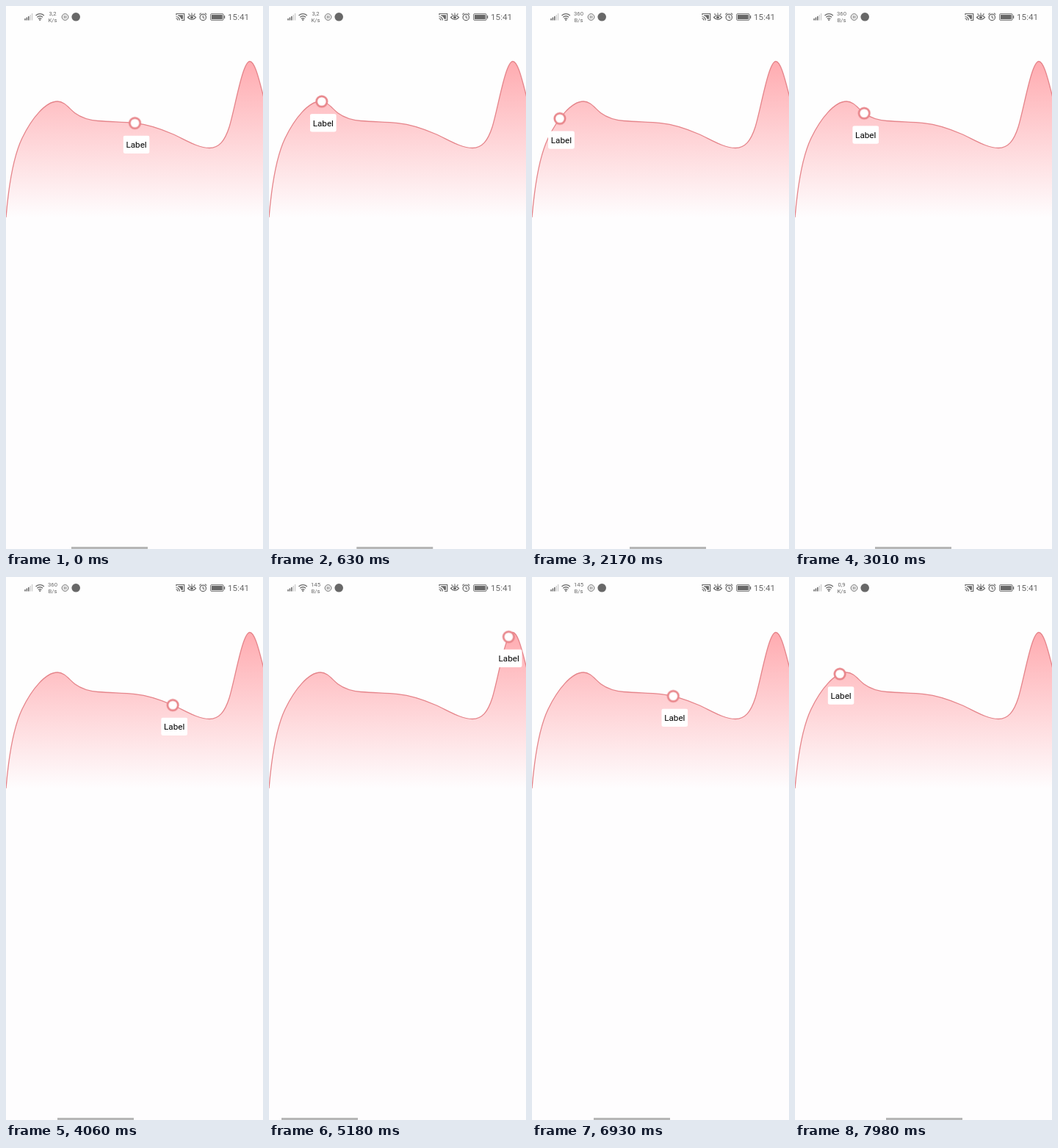
An HTML page without scripts for the animation above (8000 ms loop, 350 by 740 pixels).

```html
<!DOCTYPE html>
<html lang="en">
<head>
<meta charset="utf-8">
<title>Line chart cursor</title>
<style>
@property --bar { syntax: "<length>"; inherits: true; initial-value: 89px; }
@property --dist { syntax: "<length>"; inherits: true; initial-value: 296px; }

html, body { margin: 0; width: 100%; height: 100%; overflow: hidden; background: #fefefe; }

.stage {
  /* runs past the screen edges so that one path serves line, fill and motion */
  --curve: path("M0 288C4 240 10 205 22 180C35 153 54 130 70 130C80 130 86 140 94 146C103 152.5 113 155.5 125 156.5C145 158 160 158 175.6 159.6C194 161.5 210 167 227 174.5C243 181.5 261 193.5 277 193.5C290 193.5 298 184 304 165C312 139 322 75.5 332 75.5C338 75.5 343 93 350 121L360 161V800H-10V288");
  position: relative;
  width: 350px;
  height: 740px;
  overflow: hidden;
  font-family: Roboto, sans-serif;
  animation: scrub 8s infinite;
}
svg { position: absolute; left: 0; top: 0; display: block; }
.curve { d: var(--curve); fill: url(#fade); stroke: #e5858b; stroke-width: 1.3; }

.cursor {
  position: absolute;
  left: 0;
  top: 0;
  width: 0;
  height: 0;
  offset-path: var(--curve);
  offset-distance: var(--dist);
  offset-rotate: 0deg;
}
.cursor svg { overflow: visible; }
.dot { fill: #fff; stroke: #e8858a; stroke-width: 2.7; }
.label { font-size: 11.7px; text-anchor: middle; animation: nudge 8s linear infinite; }

.bar {
  position: absolute;
  left: 0;
  top: 737px;
  width: 103.5px;
  height: 3px;
  background: #b6b6b6;
  transform: translateX(var(--bar));
}

.status { fill: none; stroke: #686868; }
.status text, .solid { fill: #686868; stroke: none; }
.rates { font-size: 7.7px; text-anchor: middle; animation: rate 8s step-end infinite; }

/* the picture advances every 70 ms, 0.875% of the loop */
@keyframes scrub {
  0% { --bar: 89px; --dist: 296px; animation-timing-function: steps(4); }
  3.5% { --bar: 102px; --dist: 240px; animation-timing-function: steps(4); }
  7% { --bar: 116px; --dist: 194px; animation-timing-function: steps(4); }
  10.5% { --bar: 129px; --dist: 156px; animation-timing-function: steps(3); }
  13.125% { --bar: 137px; --dist: 128px; animation-timing-function: steps(3); }
  15.75% { --bar: 142px; --dist: 111px; animation-timing-function: steps(2); }
  17.5%, 18.375% { --bar: 144px; --dist: 104px; animation-timing-function: steps(4); }
  21.875% { --bar: 142px; --dist: 111px; animation-timing-function: steps(5); }
  26.25% { --bar: 135px; --dist: 135px; animation-timing-function: steps(6); }
  31.5% { --bar: 123px; --dist: 176px; animation-timing-function: steps(7); }
  37.625% { --bar: 109px; --dist: 212.5px; animation-timing-function: steps(7); }
  43.75% { --bar: 91.5px; --dist: 286px; animation-timing-function: steps(8); }
  50.75% { --bar: 70px; --dist: 350px; animation-timing-function: steps(8); }
  57.75% { --bar: 43px; --dist: 443px; animation-timing-function: steps(4); }
  61.25% { --bar: 29px; --dist: 492px; animation-timing-function: steps(4); }
  64.75% { --bar: 17px; --dist: 532.5px; animation-timing-function: steps(2); }
  66.5% { --bar: 13.5px; --dist: 542px; animation-timing-function: steps(2); }
  68.25% { --bar: 12.5px; --dist: 545px; animation-timing-function: steps(3); }
  70.875% { --bar: 17px; --dist: 532.5px; animation-timing-function: steps(3); }
  73.5% { --bar: 26px; --dist: 502px; animation-timing-function: steps(4); }
  77% { --bar: 43px; --dist: 443px; animation-timing-function: steps(5); }
  81.375% { --bar: 64px; --dist: 370px; animation-timing-function: steps(6); }
  86.625% { --bar: 84px; --dist: 313px; animation-timing-function: steps(5); }
  91% { --bar: 98px; --dist: 258px; animation-timing-function: steps(5); }
  95.375% { --bar: 111px; --dist: 208px; animation-timing-function: steps(5); }
  99.75%, 100% { --bar: 124px; --dist: 173.4px; }
}
@keyframes nudge {
  0%, 10.5%, 27%, 51%, 86% { transform: translateX(2px); }
  15.75%, 18.4% { transform: translateX(5px); }
  64.75%, 71% { transform: translateX(.3px); }
  100% { transform: translateX(1.5px); }
}
@keyframes rate {
  0% { transform: none; }
  21% { transform: translateY(-30px); }
  58.625% { transform: translateY(-60px); }
  96.25%, 100% { transform: translateY(-90px); }
}
</style>
</head>
<body>
<div class="stage">
  <svg width="350" height="740">
    <defs>
      <linearGradient id="fade" gradientUnits="userSpaceOnUse" x1="0" y1="75" x2="0" y2="288">
        <stop stop-color="#ffabb0"/>
        <stop offset="1" stop-color="#fefdfe"/>
      </linearGradient>
    </defs>
    <path class="curve"/>
  </svg>

  <svg class="status" width="350" height="30">
    <!-- signal -->
    <path d="M26 19.5v-2.5M28.4 19.5v-4M30.8 19.5v-5.5" stroke-width="1.5"/>
    <path d="M33.2 19.5v-7.5M35.6 19.5v-9.5" stroke-width="1.5" stroke="#d2d2d2"/>
    <!-- wifi -->
    <path d="M40.5 13Q46.200 8.400 51.900 13M42.300 15.300Q46.200 12.200 50.100 15.300M44 17.400Q46.200 15.700 48.400 17.400" stroke-width="1.3"/>
    <circle class="solid" cx="46.200" cy="19" r="1.100"/>
    <!-- pause -->
    <circle cx="80.500" cy="15" r="4.300"/>
    <path d="M79.300 13v4M81.700 13v4"/>
    <circle class="solid" cx="95.200" cy="14.800" r="5.800"/>
    <!-- cast -->
    <path d="M232 12.500V10.500H242.700V19.500H239M231.500 14.500a5 5 0 0 1 5 5M231.500 17a2.500 2.500 0 0 1 2.500 2.500" stroke-width="1.200"/>
    <path class="solid" d="M234 12.300h7v5.500h-2.500q-1-4-4.500-4.500z"/>
    <!-- eye -->
    <path d="M247.500 15.500Q253 9.500 258.500 15.500Q253 21.500 247.500 15.500ZM248.500 10.500l1.500 1.500M253 9.500v2M257.500 10.500l-1.500 1.500" stroke-width="1.200"/>
    <circle class="solid" cx="253" cy="15.500" r="2"/>
    <!-- alarm -->
    <circle cx="268.300" cy="15.400" r="4.200" stroke-width="1.200"/>
    <path d="M263.300 11.700l2.400-2M273.300 11.700l-2.400-2M268.300 12.800v2.800l1.900 1.200" stroke-width="1.100"/>
    <!-- battery -->
    <rect x="278.700" y="10.700" width="17.300" height="8.600" rx="1"/>
    <rect class="solid" x="280" y="12" width="14.700" height="6"/>
    <rect class="solid" x="296.900" y="13" width="1.300" height="4"/>
    <text x="302" y="19" font-size="11.700">15:41</text>
    <g class="rates">
      <text x="63.500" y="13">3,2</text><text x="63.500" y="22">K/s</text>
      <text x="63.500" y="43">360</text><text x="63.500" y="52">B/s</text>
      <text x="63.500" y="73">145</text><text x="63.500" y="82">B/s</text>
      <text x="63.500" y="103">0,9</text><text x="63.500" y="112">K/s</text>
    </g>
  </svg>

  <div class="cursor">
    <svg width="1" height="1">
      <g class="label">
        <rect x="-18" y="17" width="36" height="24.500" rx="3" fill="#fff"/>
        <text y="33.700">Label</text>
      </g>
      <circle class="dot" r="7.200"/>
    </svg>
  </div>
  <div class="bar"></div>
</div>
</body>
</html>
```
